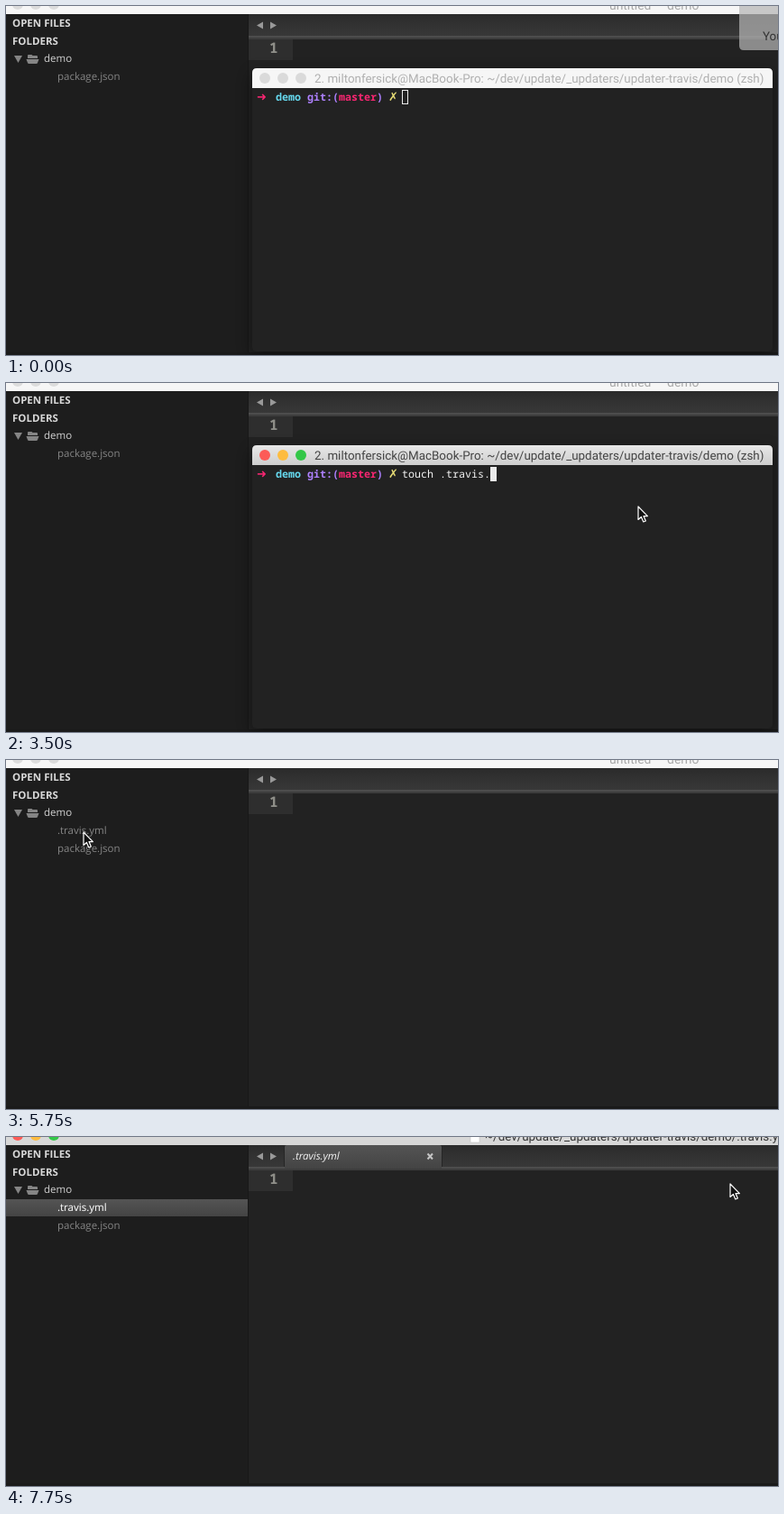
These frames come from a looping animation (856x387 px, 8 s). An HTML page:

```html
<!DOCTYPE html>
<html lang="en">
<head>
<meta charset="utf-8">
<title>Terminal and editor</title>
<style>
html, body { margin: 0; width: 100%; height: 100%; overflow: hidden; background: #222; }
svg { display: block; width: 856px; height: 387px; text-rendering: geometricPrecision; }
text { white-space: pre; }
.side { font: 11.5px "Open Sans", "Noto Sans", sans-serif; fill: #868686; }
.head { font-weight: 700; fill: #d8d8d8; }
.title { font: 13.4px Roboto, "Liberation Sans", sans-serif; }
.mono { font: 11.667px "Noto Sans Mono", "DejaVu Sans Mono", monospace; fill: #f4f4f4; }
.prompt { font-weight: 700; }
.sign { font: 700 13px "DejaVu Sans", sans-serif; }
.red { fill: #f92672; }
.cyan { fill: #66d9ef; }
.violet { fill: #ae81ff; }
.yellow { fill: #e6db74; }
.lime { fill: #a6e22e; }

/* Every step falls on a 250 ms tick, which is 3.125% of the loop. */
.anim { animation: 8s step-end infinite; }
.notice { animation-name: notice; }
.idle { animation-name: idle; }
.active { animation-name: active; }
.typing { animation-name: typing; }
.entered { animation-name: entered; }
.terminal { animation-name: terminal; }
.newfile { animation-name: newfile; }
.moved { animation-name: moved; }
.opened { animation-name: opened; }
.caret { animation-name: caret; }
.mouse { animation-name: mouse; }

@keyframes notice {
  0% { transform: none; }
  3.125% { transform: translateX(24px); }
  6.25%, 100% { transform: translateX(60px); }
}
@keyframes idle { 0% { opacity: 1; } 9.375%, 100% { opacity: 0; } }
@keyframes active { 0% { opacity: 0; } 9.375%, 100% { opacity: 1; } }
@keyframes typing {
  0% { transform: none; }
  12.5% { transform: translateX(7px); }
  15.625% { transform: translateX(21px); }
  18.75% { transform: translateX(35px); }
  21.875% { transform: translateX(42px); }
  31.25% { transform: translateX(49px); }
  34.375% { transform: translateX(63px); }
  37.5% { transform: translateX(77px); }
  40.625% { transform: translateX(91px); }
  43.75% { transform: translateX(98px); }
  46.875% { transform: translateX(105px); }
  50% { transform: translateX(119px); }
  56.25%, 100% { transform: translateY(16px); }
}
@keyframes entered { 0% { opacity: 0; } 56.25%, 100% { opacity: 1; } }
@keyframes terminal { 0% { opacity: 1; } 71.875%, 100% { opacity: 0; } }
@keyframes newfile { 0% { opacity: 0; } 59.375%, 100% { opacity: 1; } }
@keyframes moved { 0% { transform: none; } 59.375%, 100% { transform: translateY(20px); } }
@keyframes opened { 0% { opacity: 0; } 78.125%, 100% { opacity: 1; } }
@keyframes caret {
  0%, 84.375%, 90.625%, 96.875%, 100% { opacity: 0; }
  78.125%, 87.5%, 93.75% { opacity: 1; }
}
@keyframes mouse {
  0% { transform: translate(880px, 20px); }
  3.125% { transform: translate(838px, 62px); }
  6.25% { transform: translate(722px, 126px); }
  9.375% { transform: translate(701px, 137px); }
  59.375% { transform: translate(655px, 164px); }
  62.5% { transform: translate(470px, 169px); }
  65.625% { transform: translate(270px, 148px); }
  68.75% { transform: translate(118px, 98px); }
  71.875% { transform: translate(86px, 80px); }
  84.375% { transform: translate(150px, 92px); }
  87.5% { transform: translate(380px, 111px); }
  90.625% { transform: translate(620px, 106px); }
  93.75% { transform: translate(748px, 82px); }
  96.875%, 100% { transform: translate(803px, 52px); }
}
</style>
</head>
<body>
<svg viewBox="0 0 856 387">
  <defs>
    <linearGradient id="bar" x2="0" y2="1"><stop stop-color="#e8e8e8"/><stop offset="1" stop-color="#cecece"/></linearGradient>
    <linearGradient id="tabs" x2="0" y2="1"><stop stop-color="#2b2b2b"/><stop offset="1" stop-color="#383838"/></linearGradient>
    <linearGradient id="tab" x2="0" y2="1"><stop stop-color="#545454"/><stop offset="1" stop-color="#444"/></linearGradient>
    <filter id="blur" x="-10%" y="-10%" width="120%" height="120%"><feGaussianBlur stdDeviation="9"/></filter>
    <g id="dots"><circle r="6"/><circle cx="20" r="6"/><circle cx="40" r="6"/></g>
    <g id="lights">
      <circle r="6" fill="#fc5b57"/><circle cx="20" r="6" fill="#fdbc40"/><circle cx="40" r="6" fill="#33c748"/>
    </g>
    <path id="termbar" d="M273 91V74Q273 69 278 69H845Q850 69 850 74V91Z"/>
    <text id="termtitle" class="title" x="342" y="85">2. miltonfersick@MacBook-Pro: ~/dev/update/_updaters/updater-travis/demo (zsh)</text>
    <text id="prompt" class="mono prompt" y="105"><tspan x="299" class="cyan">demo</tspan><tspan x="334" class="violet">git:(</tspan><tspan x="369" class="red">master</tspan><tspan x="411" class="violet">)</tspan><tspan x="424" class="yellow sign" font-size="11">✗</tspan></text>
  </defs>

  <!-- editor -->
  <rect width="856" height="387" fill="#222"/>
  <rect y="9" width="269" height="378" fill="#1d1d1d"/>
  <rect x="268" y="9" width="1" height="378" fill="#181818"/>
  <rect x="269" y="9" width="587" height="24" fill="url(#tabs)"/>
  <rect x="269" y="33" width="587" height="2" fill="#4d4d4d"/>
  <rect x="269" y="35" width="587" height="2" fill="#3d3d3d"/>
  <rect x="269" y="37" width="49" height="23" fill="#2e2e2e"/>
  <rect y="384" width="856" height="3" fill="#1a1a1a"/>
  <path d="M285 17.5V25.5L278 21.5ZM293 17.5V25.5L300 21.5Z" fill="#999"/>
  <text class="mono prompt" x="292" y="51.5" style="font-size:16px;fill:#8f8f89">1</text>

  <rect width="856" height="9" fill="#f6f6f6"/>
  <use href="#dots" x="13" y="-2" fill="#dcdcdc"/>
  <text class="title" x="669" y="4" fill="#a8a8a8" style="font-size:13.9px">untitled — demo</text>

  <g class="anim opened">
    <rect width="856" height="9" fill="#d8d8d8"/>
    <use href="#lights" x="13" y="-2"/>
    <rect x="515" y="-6" width="10" height="12" fill="#fff" stroke="#bbb" stroke-width=".5"/>
    <text class="title" x="531" y="4" fill="#333">~/dev/update/_updaters/updater-travis/demo/.travis.yml</text>
    <path d="M309 35V11Q309 9 311 9H481Q483 9 483 11V35Z" fill="url(#tab)"/>
    <path d="M308.5 33V10M483.5 33V10" stroke="#252525"/>
    <text class="side" x="318" y="25" style="font-style:italic;fill:#f2f2f2">.travis.yml</text>
    <path d="M467.5 18.5L473 24.5M473 18.5L467.5 24.5" stroke="#c4c4c4" stroke-width="2"/>
    <rect y="69" width="268" height="19" fill="url(#tab)"/>
  </g>
  <rect class="anim caret" x="322" y="38" width="1" height="21" fill="#f8f8f0"/>

  <!-- sidebar -->
  <text class="side head" x="7" y="23">OPEN FILES</text>
  <text class="side head" x="7" y="43">FOLDERS</text>
  <path d="M9 55H18L13.5 63Z" fill="#858585"/>
  <path d="M24 58V55Q24 54 25 54H28.5L29.5 55H34Q35 55 35 56V58ZM22.5 59H36.5L35 63Q34.7 64 33.7 64H25.3Q24.3 64 24 63Z" fill="#858585"/>
  <text class="side" x="42" y="62" style="fill:#d2d2d2">demo</text>
  <text class="side anim newfile" x="57" y="82">.travis.yml</text>
  <text class="side anim opened" x="57" y="82" style="fill:#f4f4f4">.travis.yml</text>
  <text class="side anim moved" x="57" y="82">package.json</text>

  <!-- terminal -->
  <g class="anim terminal">
    <rect x="273" y="75" width="577" height="312" rx="5" fill="#000" opacity=".45" filter="url(#blur)"/>
    <path d="M273 90H850V378Q850 383 845 383H278Q273 383 273 378Z" fill="#222"/>
    <g class="anim idle">
      <use href="#termbar" fill="#f6f6f6"/>
      <use href="#dots" x="287" y="80" fill="#dadada"/>
      <use href="#termtitle" fill="#b0b0b0"/>
    </g>
    <g class="anim active">
      <use href="#termbar" fill="url(#bar)"/>
      <use href="#lights" x="287" y="80"/>
      <use href="#termtitle" fill="#444"/>
    </g>
    <text class="sign red" x="278" y="105">➜</text>
    <use href="#prompt"/>
    <text class="mono" x="439" y="105" font-weight="500">touch .travis.yml</text>
    <g class="anim entered">
      <text class="sign lime" x="278" y="121">➜</text>
      <use href="#prompt" y="16"/>
    </g>
    <g class="anim typing">
      <rect x="439" y="93" width="140" height="16" fill="#222"/>
      <rect x="439" y="93" width="7" height="16" fill="#ebebeb"/>
      <rect class="anim idle" x="440" y="94" width="5" height="14" fill="#222"/>
    </g>
  </g>

  <!-- notification -->
  <g class="anim notice">
    <path d="M813 0H900V49H818Q813 49 813 44Z" fill="#b4b4b4" opacity=".72"/>
    <text class="title" x="839" y="38" fill="#333">You</text>
  </g>

  <path class="anim mouse" d="M0 0V14.5L3.4 11.5L5.8 17L8.3 16L6 10.6H10.4Z" fill="#111" stroke="#fff" stroke-width="1.2" stroke-linejoin="round"/>
</svg>
</body>
</html>
```
